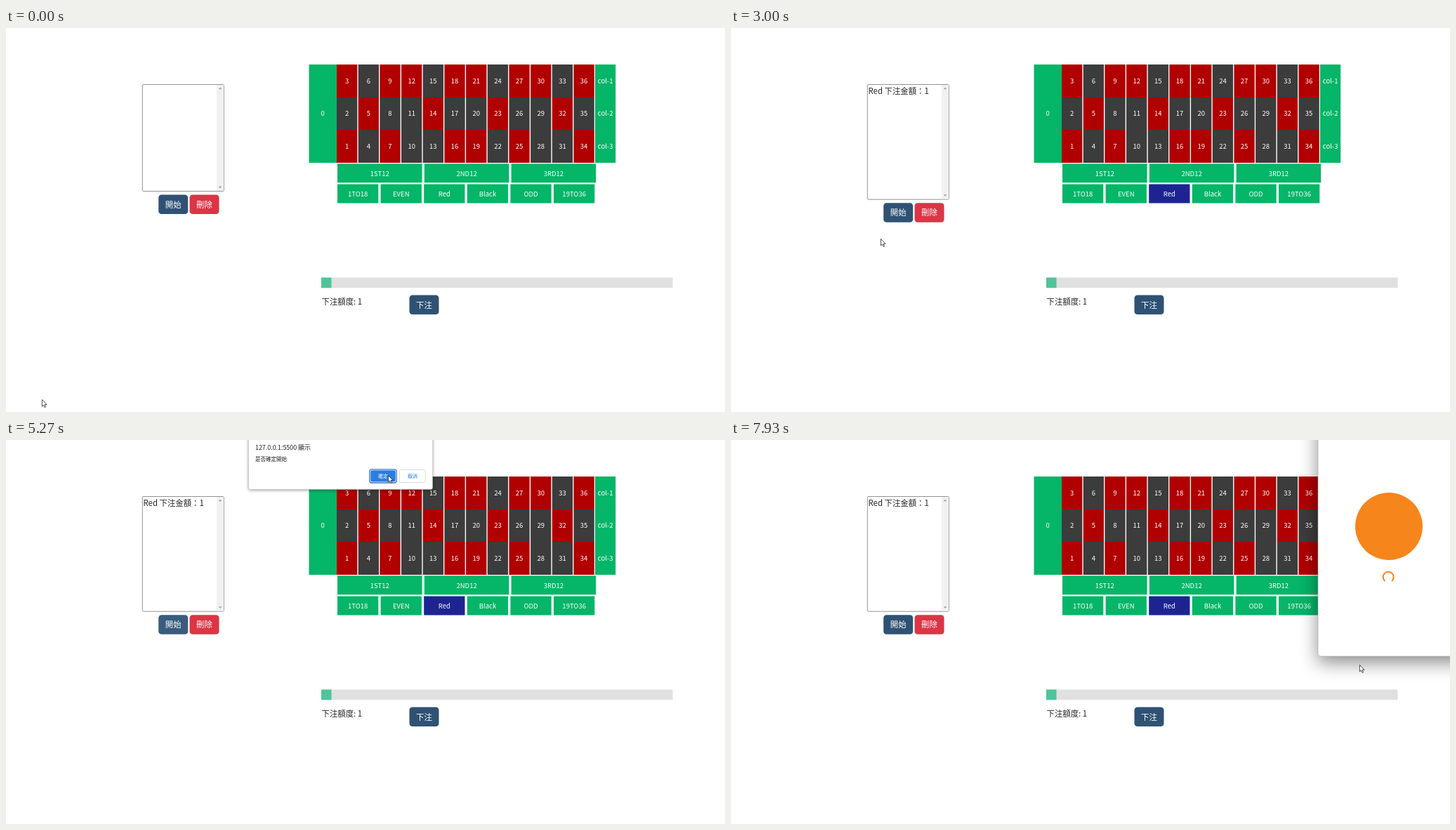
These frames come from a looping animation (1024 px wide and 547 px high, 8 s). An HTML page:

```html
<!DOCTYPE html>
<html lang="zh-Hant">
<head>
<meta charset="utf-8">
<style>
html, body { margin: 0; height: 100%; overflow: hidden; background: #fff; }
svg { display: block; width: 1024px; height: 547px; font-family: "Noto Sans CJK TC", "Noto Sans CJK JP", "Noto Sans CJK", sans-serif; }
</style>
</head>
<body>
<svg id="stage" viewBox="0 0 1024 547"></svg>
<script>
const stage = document.getElementById('stage');
const GREEN = '#05b568', RED = '#b00000', BLACK = '#3c3c3c', NAVY = '#2f5274', INK = '#212529';
const LIT = { [GREEN]: '#05c172', [RED]: '#bd1414', [BLACK]: '#4a4a4a' };

function add(parent, tag, attrs, content) {
  const el = document.createElementNS('http://www.w3.org/2000/svg', tag);
  for (const name in attrs) el.setAttribute(name, attrs[name]);
  if (content !== undefined) el.textContent = content;
  return parent.appendChild(el);
}
const rect = (parent, x, y, width, height, fill, more) =>
  add(parent, 'rect', { x, y, width, height, fill, ...more });
// y is the vertical middle of the glyphs
const text = (parent, x, y, size, fill, content, more) =>
  add(parent, 'text', { x, y: y + size * 0.367, 'font-size': size, fill, ...more }, content);
const CENTERED = { 'text-anchor': 'middle' }, LIGHT = { 'font-weight': 300 };
const show = (el, visible) => el.setAttribute('display', visible ? 'inline' : 'none');
const contains = (box, [x, y]) => x >= box.x && x < box.x + box.w && y >= box.y && y < box.y + box.h;

// Betting table
const cells = [];
function cell(x, y, w, h, fill, label, labelShift = 0) {
  const el = rect(stage, x, y, w, h, fill);
  text(stage, x + w / 2, y + h / 2 + labelShift, 9.5, '#fff', label, { ...CENTERED, 'font-weight': 500 });
  cells.push({ x, y, w, h, el, fill, label });
}
// Odd numbers are red in the first ten of every eighteen, even ones in the rest
const isRed = n => (n % 18 >= 1 && n % 18 <= 10) === (n % 2 === 1);
const rowTop = row => Math.round(52 + row * 140 / 3);
cell(431.5, 52, 39.5, 140, GREEN, '0');
for (let row = 0; row < 3; row++) {
  const y = rowTop(row), h = rowTop(row + 1) - y;
  for (let col = 0; col < 12; col++) {
    const n = col * 3 + 3 - row;
    cell(471 + col * 30.68, y, 29.3, h, isRed(n) ? RED : BLACK, n);
  }
  cell(839, y, 29.2, h, GREEN, 'col-' + (row + 1));
}
['1ST12', '2ND12', '3RD12'].forEach((label, i) => cell(472 + i * 123.8, 193.3, 120.6, 27, GREEN, label, 1));
['1TO18', 'EVEN', 'Red', 'Black', 'ODD', '19TO36'].forEach((label, i) =>
  cell(472 + i * 61.6, 222.5, 58.3, 27, GREEN, label, 1));

// Bet list with its scrollbar
const list = rect(stage, 194.3, 80.5, 116, 152, '#fff', { rx: 1.5, stroke: '#767676', 'stroke-width': 0.8 });
const scrollbar = rect(stage, 300, 81, 10, 151, '#f1f1f1');
add(stage, 'path', { d: 'M302.7 87.2h4.6l-2.3-2.8z', fill: '#a3a3a3' });
const downArrow = add(stage, 'path', { d: 'M302.7 225.6h4.6l-2.3 2.8z', fill: '#a3a3a3' });
const betRow = text(stage, 195.5, 89.8, 11.4, INK, 'Red 下注金額：1', LIGHT);

function button(parent, x, y, fill, label) {
  const el = rect(parent, x, y, 42, 27.6, fill, { rx: 4.3 });
  text(parent, x + 21, y + 14, 11.4, '#fff', label, { ...CENTERED, ...LIGHT });
  return { x, y, w: 42, h: 27.6, el };
}
const actions = add(stage, 'g');
const startButton = button(actions, 217.2, 237.5, NAVY, '開始');
button(actions, 261.5, 237.5, '#dc3545', '刪除');

// Stake slider
rect(stage, 449, 355.5, 500.5, 14.7, '#e0e0e0');
rect(stage, 449, 355.5, 14.5, 14.7, '#4fc49a');
text(stage, 449.5, 389.7, 11.4, INK, '下注額度: 1', LIGHT);
const betButton = button(stage, 574.5, 380.5, NAVY, '下注');

// Confirmation dialog
const dialog = add(stage, 'g', { style: 'filter:drop-shadow(0 1px 2px rgba(0,0,0,.4))' });
rect(dialog, 345.5, -8, 262, 78.3, '#fff', { rx: 2.5, stroke: '#c4c4c4', 'stroke-width': 0.6 });
text(dialog, 355, 11, 8.9, '#202124', '127.0.0.1:5500 顯示', LIGHT);
text(dialog, 355, 27.3, 7.5, '#202124', '是否確定開始', LIGHT);
rect(dialog, 517.8, 41.8, 38.4, 19.2, '#fff', { rx: 3, stroke: '#3b78c9', 'stroke-width': 1.3 });
const okButton = rect(dialog, 519.2, 43.2, 35.6, 16.4, '#1a73e8', { rx: 2 });
text(dialog, 537, 51.6, 7, '#fff', '確定', CENTERED);
rect(dialog, 560.5, 42.5, 37, 18, '#fff', { rx: 2.5, stroke: '#dadce0' });
text(dialog, 579, 51.6, 7, '#1a73e8', '取消', CENTERED);

// Wallet popup
const popup = add(stage, 'g');
rect(popup, 836, -40, 240, 348, '#fff', {
  rx: 4, stroke: '#aaa', 'stroke-width': 0.6, style: 'filter:drop-shadow(0 9px 13px rgba(0,0,0,.45))'
});
add(popup, 'circle', { cx: 937, cy: 123, r: 48, fill: '#f6851b' });
const spinner = add(popup, 'circle', {
  cx: 936.2, cy: 195.2, r: 7.5, fill: 'none', stroke: '#f6851b', 'stroke-width': 2,
  pathLength: 360, 'stroke-dasharray': '280 80'
});

// Pointers, both with the hot spot at 0,0
const outline = { fill: '#fff', stroke: '#222', 'stroke-width': 0.8, 'stroke-linejoin': 'round' };
const arrow = add(stage, 'path', { d: 'M.4 .4V10L2.5 8 4.1 11.5 5.6 10.9 4.1 7.4H7Z', ...outline });
const hand = add(stage, 'path', {
  d: 'M-1 1Q0-.8 1 1V5Q2 4.2 3 5.2 4 4.6 4.8 5.6 6.2 5.2 6.4 7V10L5.3 13.5H-.4L-3.6 8.8Q-3.6 7-2 7.8L-1 9Z', ...outline
});

// Eased pointer moves: first step, last step, destination, optional bend towards a point
const STEP = 200 / 3, STEPS = 120;
const moves = [
  { from: 0, to: 2, end: [19, 551] },
  { from: 5, to: 5, end: [192, 410] },
  { from: 5, to: 7, end: [304, 264] },
  { from: 9, to: 22, end: [634, 217], bend: [560, 130] },
  { from: 22, to: 26, end: [628, 236] },
  { from: 31, to: 37, end: [597, 400], bend: [300, 340] },
  { from: 41, to: 45, end: [213, 300] },
  { from: 45, to: 50, end: [237, 261] },
  { from: 60, to: 63, end: [463, 83] },
  { from: 63, to: 73, end: [544, 50] },
  { from: 81, to: 93, end: [796, 243] },
  { from: 93, to: 98, end: [724, 262] },
  { from: 98, to: 105, end: [874, 323] },
  { from: 105, to: 119, end: [895, 320] }
];
function pointerAt(step) {
  let point = [51, 529];
  for (const { from, to, end, bend } of moves) {
    if (step < from) break;
    const t = step >= to ? 1 : (step - from) / (to - from), k = t * t * (3 - 2 * t);
    point = point.map((start, axis) => {
      const via = bend ? bend[axis] : (start + end[axis]) / 2;
      return (1 - k) ** 2 * start + 2 * k * (1 - k) * via + k * k * end[axis];
    });
  }
  return point;
}

function render(step) {
  const point = pointerAt(step), before = pointerAt(step - 1);
  const picked = step >= 31, placed = step >= 41;
  const modal = step >= 55 && step < 81, popupOpen = step >= 98;
  const shift = placed ? 11.7 : 0;

  for (const c of cells) {
    const hover = !modal && contains(c, point) && contains(c, before);
    const fill = picked && c.label === 'Red' ? '#1d2492' : hover ? LIT[c.fill] : c.fill;
    c.el.setAttribute('fill', fill);
  }

  list.setAttribute('height', 152 + shift);
  scrollbar.setAttribute('height', 151 + shift);
  for (const el of [downArrow, actions]) el.setAttribute('transform', `translate(0 ${shift})`);
  show(betRow, placed);

  const onStart = modal || contains({ ...startButton, y: startButton.y + shift }, point);
  const onBet = contains(betButton, point);
  startButton.el.setAttribute('fill', onStart ? '#3a5b7c' : NAVY);
  betButton.el.setAttribute('fill', onBet ? '#3a5b7c' : NAVY);

  show(dialog, modal);
  dialog.setAttribute('opacity', Math.min(1, (step - 54) / 4));
  okButton.setAttribute('fill', step >= 68 ? '#2b7de1' : '#1a73e8');

  show(popup, popupOpen);
  spinner.setAttribute('transform', `rotate(${130 + (step - 119) * 24} 936.2 195.2)`);

  const useHand = modal ? point[1] > 70 : onStart || onBet;
  for (const el of [arrow, hand]) el.setAttribute('transform', `translate(${point})`);
  show(hand, useHand);
  show(arrow, !useHand);
}

const began = performance.now();
function tick() {
  const time = (performance.now() - began) % 8000;
  render(Math.min(STEPS - 1, Math.floor((time + 5) / STEP)));
  requestAnimationFrame(tick);
}
tick();
</script>
</body>
</html>
```
